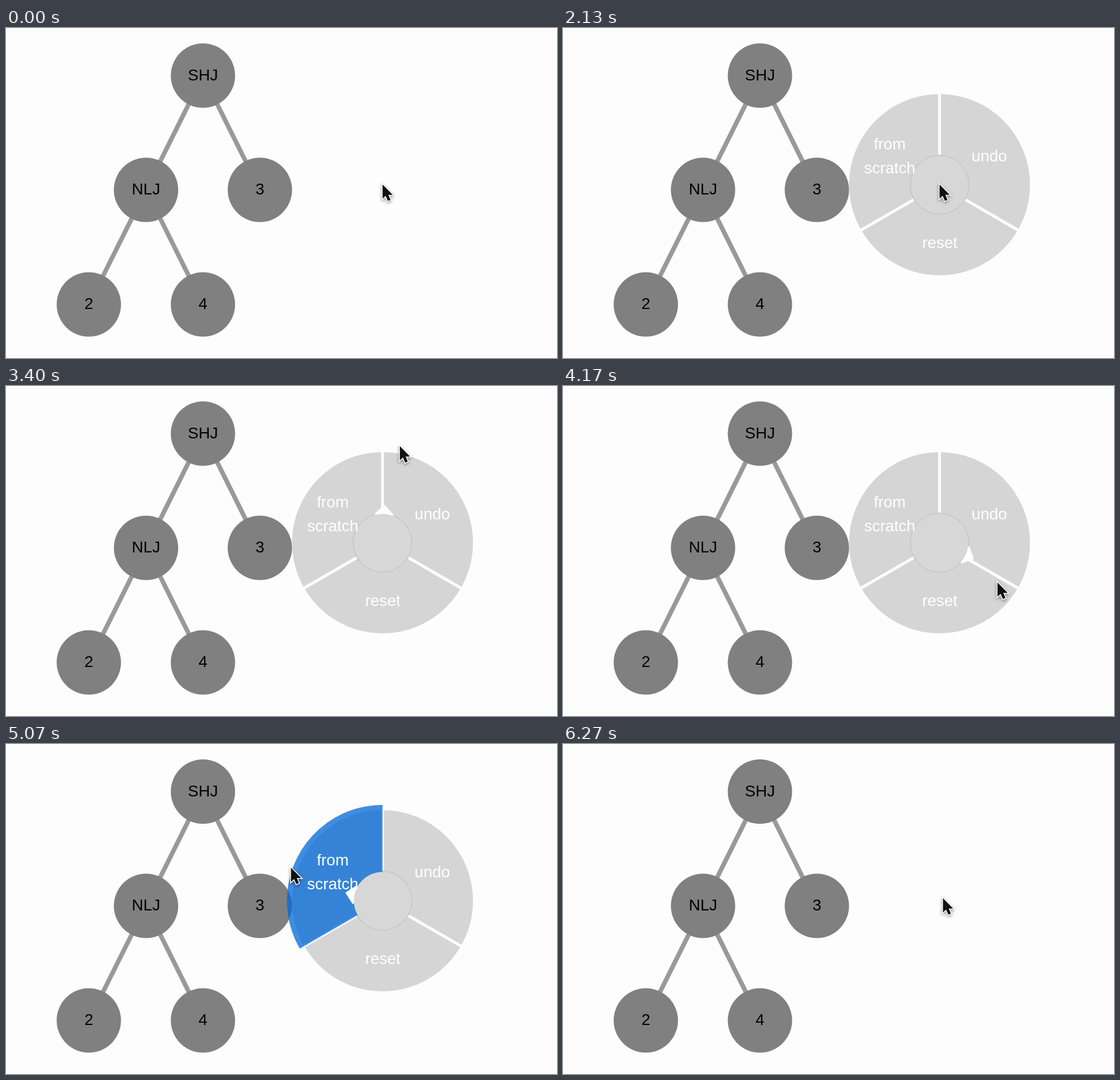
Recreate the animation shown at these times as an HTML page with a canvas. Size 968x579 px, loop 6810 ms.

```html
<!DOCTYPE html>
<html lang="en">
<head>
<meta charset="utf-8">
<title>Join tree with radial menu</title>
<style>
  html, body { margin: 0; width: 100%; height: 100%; overflow: hidden; background: #fdfdfd; }
  canvas { display: block; }
</style>
</head>
<body>
<canvas id="stage" width="968" height="579"></canvas>
<script>
const ctx = document.getElementById('stage').getContext('2d');
const TAU = Math.PI * 2, LOOP = 6810;
const PRESS = 360, OPEN = 860, RELEASE = 6070, LAG = 50;
const PAPER = '#fdfdfd';
const CX = 661.5, CY = 275, OUTER = 159, INNER = 50.5, RIM = 52.5;

const nodes = [
  ['SHJ', 346, 83.5], ['NLJ', 246, 284], ['3', 446, 284],
  ['2', 145.5, 485], ['4', 346, 485]
];
const edges = [[0, 1], [0, 2], [1, 3], [1, 4]];

// time, x, y of the pointer
const path = [
  [0, 661, 273], [2430, 661, 273], [2800, 591, 263], [2950, 560, 225],
  [3150, 590, 140], [3400, 691, 104], [3600, 765, 140], [3830, 793, 216],
  [4170, 763, 343], [4500, 660, 414], [4750, 560, 370], [4900, 515, 300],
  [5070, 500, 216], [5250, 570, 145], [5450, 685, 130], [5620, 742, 195],
  [5780, 715, 258], [5950, 667, 269], [LOOP, 667, 269]
];

function slope(i, k) {
  if (i < 2 || i > path.length - 3) return 0;
  const a = path[i - 1], b = path[i + 1];
  return (b[k] - a[k]) / (b[0] - a[0]);
}

function pointer(t) {
  t = Math.max(0, t);
  let i = 0;
  while (i < path.length - 2 && path[i + 1][0] <= t) i++;
  const a = path[i], b = path[i + 1], span = b[0] - a[0];
  const u = (t - a[0]) / span, v = 1 - u;
  return [1, 2].map(k =>
    v * v * (1 + 2 * u) * a[k] + u * u * (3 - 2 * u) * b[k] +
    span * u * v * (v * slope(i, k) - u * slope(i + 1, k)));
}

function disc(x, y, r, color) {
  ctx.fillStyle = color;
  ctx.beginPath();
  ctx.arc(x, y, r, 0, TAU);
  ctx.fill();
}

function line(x1, y1, x2, y2, width, color) {
  ctx.lineWidth = width;
  ctx.strokeStyle = color;
  ctx.beginPath();
  ctx.moveTo(x1, y1);
  ctx.lineTo(x2, y2);
  ctx.stroke();
}

function label(text, x, y, color) {
  ctx.fillStyle = color;
  ctx.fillText(text, x, y);
}

function drawTree() {
  for (const [a, b] of edges)
    line(nodes[a][1], nodes[a][2], nodes[b][1], nodes[b][2], 8, '#999');
  for (const [name, x, y] of nodes) {
    disc(x, y, 56.5, '#808080');
    label(name, x, Math.floor(y + 8.5), '#000');
  }
}

function drawMenu(t) {
  const [px, py] = pointer(t - LAG);
  const dx = px - CX, dy = py - CY;
  const angle = Math.atan2(dy, dx);
  const aiming = Math.hypot(dx, dy) > INNER;
  const start = Math.PI * 5 / 6, end = Math.PI * 3 / 2;
  const turned = (angle + TAU) % TAU;

  disc(CX, CY, OUTER, '#d5d5d5');
  for (let i = 0; i < 3; i++) {
    const a = -Math.PI / 2 + i * TAU / 3, c = Math.cos(a), s = Math.sin(a);
    line(CX + RIM * c, CY + RIM * s, CX + 161 * c, CY + 161 * s, 5, PAPER);
  }
  disc(CX, CY, RIM, '#c9c9c9');

  // only the left wedge is enabled
  if (aiming && turned > start && turned < end) {
    ctx.fillStyle = 'rgba(1,105,217,.75)';
    ctx.beginPath();
    ctx.arc(CX, CY, 168, start, end);
    ctx.arc(CX, CY, 49.5, end, start, true);
    ctx.fill();
  }
  if (aiming) {
    ctx.save();
    ctx.translate(CX + 50 * Math.cos(angle), CY + 50 * Math.sin(angle));
    ctx.rotate(angle + Math.PI / 4);
    ctx.fillStyle = PAPER;
    ctx.fillRect(-12, -12, 24, 24);
    ctx.restore();
  }
  disc(CX, CY, INNER, '#d7d7d7');

  label('undo', 749, 234, '#fff');
  label('reset', 662, 386, '#fff');
  label('from', 574, 213, '#fff');
  label('scratch', 574, 255, '#fff');
}

const arrow = new Path2D('M0 1.5V26.5L5.5 21.5 9.5 30.5 14 28.5 10.2 19.8H18Z');

function drawPointer(t) {
  const [x, y] = pointer(t);
  ctx.save();
  ctx.translate(x + .5, y);
  ctx.lineJoin = 'miter';
  ctx.lineWidth = 3;
  ctx.strokeStyle = '#fff';
  ctx.shadowColor = 'rgba(0,0,0,.45)';
  ctx.shadowBlur = 5;
  ctx.shadowOffsetY = 2;
  ctx.stroke(arrow);
  ctx.shadowColor = 'transparent';
  ctx.fillStyle = '#111';
  ctx.fill(arrow);
  ctx.restore();
}

function draw(t) {
  ctx.fillStyle = PAPER;
  ctx.fillRect(0, 0, 968, 579);
  ctx.font = '28px "Liberation Sans", Arial, sans-serif';
  ctx.textAlign = 'center';
  drawTree();
  if (t >= OPEN && t < RELEASE) drawMenu(t);
  else if (t >= PRESS && t < OPEN) disc(CX, CY, RIM, '#d7d7d7');
  drawPointer(t);
}

const begin = performance.now();
function tick() {
  draw((performance.now() - begin) % LOOP);
  requestAnimationFrame(tick);
}
tick();
</script>
</body>
</html>
```
